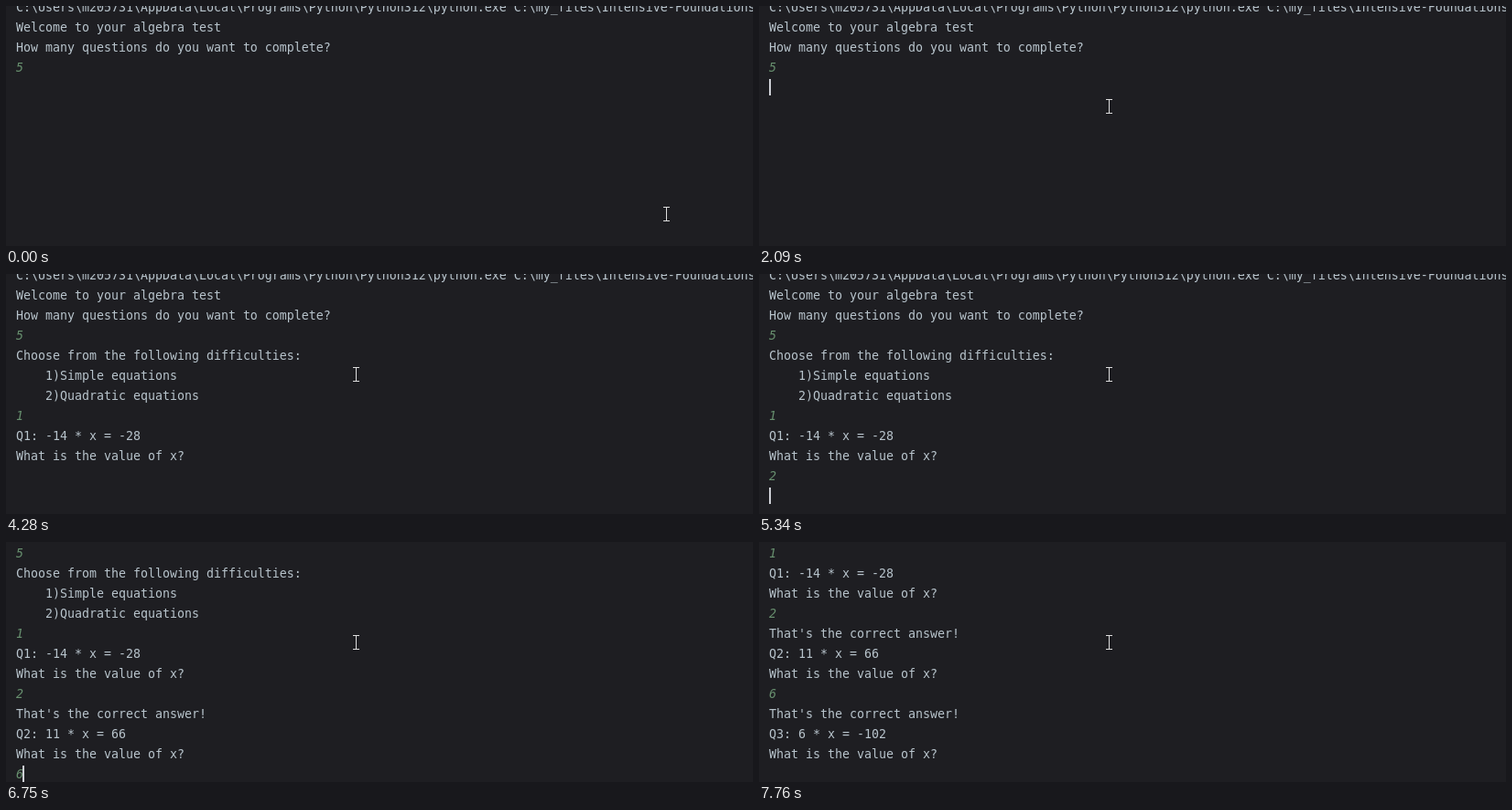
Animation, 816 px wide and 263 px high, one loop 8000 ms. Source, as an HTML page:

```html
<!DOCTYPE html>
<html lang="en">
<head>
<meta charset="utf-8">
<title>Algebra test console</title>
<style>
  html, body { margin: 0; width: 100%; height: 100%; overflow: hidden; background: #1e1e22; }
  svg { display: block; }
  text {
    font: 13.29px "DejaVu Sans Mono", "Noto Sans Mono", monospace;
    fill: #b8c4cc;
    white-space: pre;
  }
  .input { font-style: italic; fill: #68906f; }
</style>
</head>
<body>
<svg width="816" height="263" viewBox="0 0 816 263">
  <g id="page">
    <rect id="caret" width="2" height="18" fill="#ced0d6"/>
  </g>
  <path id="mouse" fill="none" stroke="#dedede" d="M-3.5 -7.5H3.5M-3.5 7.5H3.5M0 -7V7"/>
</svg>
<script>
const LOOP = 8000, ROW = 22, LEFT = 11;
const REPLY = 200;                    // program answers this long after Enter
const FOCUS = 1390;                   // console gets the caret
const BLINK = 496, PHASE = 300, HOLD = 450;
const SCROLL_LAG = 30, FIRST_PART = 0.38;

const $ = id => document.getElementById(id);
const page = $('page'), caret = $('caret'), mouse = $('mouse');

const right = "That's the correct answer!";
const question = (n, a, x) => [`Q${n}: ${a} * x = ${a * x}`, 'What is the value of x?'];

const rounds = [
  { lines: [
      'C:\\Users\\m205731\\AppData\\Local\\Programs\\Python\\Python312\\python.exe C:\\my_files\\Intensive-Foundations',
      'Welcome to your algebra test',
      'How many questions do you want to complete?'
    ], answer: '5', typed: 0, enter: 2090 },
  { lines: [
      'Choose from the following difficulties:',
      '    1)Simple equations',
      '    2)Quadratic equations'
    ], answer: '1', typed: 2990, enter: 3400 },
  { lines: question(1, -14, 2), answer: '2', typed: 5180, enter: 5340 },
  { lines: [right, ...question(2, 11, 6)], answer: '6', typed: 6750, enter: 6880 },
  { lines: [right, ...question(3, 6, -17)] }
];

// Pointer key points
const pointer = [
  { time: 0, x: 723, y: 229 },
  { time: 270, x: 391, y: 125 },
  { time: 350, x: 450, y: 148 },
  { time: 1040, x: 450, y: 148 },
  { time: 1390, x: 382, y: 110 }
];

const rows = [];     // { time, el }
const events = [];   // { time, row, col, scroll, print }

function addRow(time, text, typed) {
  const el = document.createElementNS('http://www.w3.org/2000/svg', 'text');
  el.setAttribute('x', LEFT);
  el.setAttribute('y', 6 + rows.length * ROW);
  if (typed) el.setAttribute('class', 'input');
  el.textContent = text;
  page.insertBefore(el, caret);
  rows.push({ time, el });
}

function addEvent(time, row, col, print = false) {
  events.push({ time, row, col, print, scroll: Math.max(0, row * ROW - 253) });
}

let shown = 0;
for (const { lines, answer, typed, enter } of rounds) {
  lines.forEach(line => addRow(shown, line));
  addEvent(shown, rows.length, 0, true);
  if (!answer) break;
  addRow(typed, answer, true);
  addEvent(typed, rows.length - 1, 1);
  addEvent(enter, rows.length, 0);
  shown = enter + REPLY;
}

// Blink ticks run on one clock; those soon after an event are skipped.
function caretOn(t, since) {
  const tick = time => Math.floor((time - PHASE) / BLINK);
  const ticks = tick(t) - tick(since + HOLD);
  return t >= FOCUS && (ticks <= 0 || ticks % 2 === 0);
}

function pointerAt(t) {
  const i = pointer.findLastIndex(p => p.time <= t);
  const a = pointer[i], b = pointer[i + 1] || a;
  const p = a === b ? 0 : (t - a.time) / (b.time - a.time);
  const eased = 1 - (1 - p) ** 2;
  return ['x', 'y'].map(k => Math.round(a[k] + (b[k] - a[k]) * eased));
}

function draw(t) {
  for (const { time, el } of rows) el.style.visibility = t >= time ? 'visible' : 'hidden';

  const i = events.findLastIndex(e => e.time <= t);
  const now = events[i], before = events[i - 1] || now;
  const part = now.print && t - now.time < SCROLL_LAG ? FIRST_PART : 1;
  const scroll = Math.round(before.scroll + (now.scroll - before.scroll) * part);
  page.setAttribute('transform', `translate(0 ${-scroll})`);

  caret.style.visibility = caretOn(t, Math.max(FOCUS, now.time)) ? 'visible' : 'hidden';
  caret.setAttribute('x', LEFT + now.col * 7);
  caret.setAttribute('y', now.row * ROW - 8);

  const [x, y] = pointerAt(t);
  mouse.setAttribute('transform', `translate(${x + 0.5} ${y})`);
}

const begin = performance.now();
function tick() {
  draw((performance.now() - begin) % LOOP);
  requestAnimationFrame(tick);
}
draw(0);
requestAnimationFrame(tick);
</script>
</body>
</html>
```
